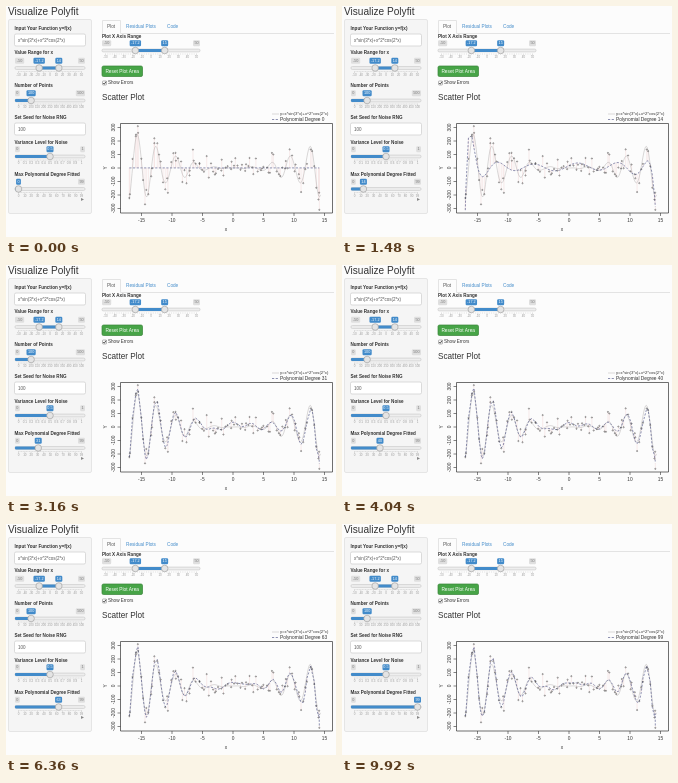
Recreate the animation shown at these times as an HTML page with a canvas. Size 330 by 231 pixels, loop 10000 ms.

```html
<!DOCTYPE html>
<html lang="en">
<head>
<meta charset="utf-8">
<title>Visualize Polyfit</title>
<style>
html, body { margin: 0; width: 100%; height: 100%; overflow: hidden; background: #fcfcfc; }
canvas { display: block; width: 330px; height: 231px; }
</style>
</head>
<body>
<canvas id="stage" width="330" height="231"></canvas>
<script>
const ctx = document.getElementById('stage').getContext('2d');
const FONT = '"Liberation Sans", Arial, sans-serif';
const BLUE = '#428bca', INK = '#333', PAPER = '#fcfcfc';
const CURVE = '#b4b0b0', FIT = '#454a80', ERROR = '#f3d9d9';
const LOOP = 10000;

function text(str, x, y, size, { color = INK, bold = false, align = 'left', turn = 0 } = {}) {
  ctx.save();
  ctx.translate(x, y);
  ctx.rotate(turn);
  ctx.font = `${bold ? 'bold ' : ''}${size}px ${FONT}`;
  ctx.fillStyle = color;
  ctx.textAlign = align;
  ctx.textBaseline = 'middle';
  ctx.fillText(str, 0, 0);
  ctx.restore();
}

function box(x, y, w, h, fill, stroke, r = 1) {
  ctx.beginPath();
  ctx.roundRect(x, y, w, h, r);
  if (fill) { ctx.fillStyle = fill; ctx.fill(); }
  if (stroke) { ctx.strokeStyle = stroke; ctx.lineWidth = 0.7; ctx.stroke(); }
}

function line(points, color, width = 0.6, dash = []) {
  ctx.beginPath();
  points.forEach(([x, y]) => ctx.lineTo(x, y));
  ctx.strokeStyle = color;
  ctx.lineWidth = width;
  ctx.setLineDash(dash);
  ctx.stroke();
  ctx.setLineDash([]);
}

// Slider with value bubbles; y is the centre of the track.
function slider({ x, w, y, min, max, values, step }) {
  const pos = v => x + 3.5 + (w - 7) * (v - min) / (max - min);
  const handles = values.map(pos);
  const tagWidth = v => 2.6 + 2.2 * String(v).replace('.', '').length;
  const lastIndex = values.length - 1;
  const first = handles[0] - tagWidth(values[0]) / 2;
  const last = handles[lastIndex] + tagWidth(values[lastIndex]) / 2;
  const tag = (value, cx, fill, color) => {
    const width = tagWidth(value);
    box(cx - width / 2, y - 10.3, width, 6, fill, null, 1.2);
    text(value, cx, y - 7.1, 3.8, { color, align: 'center' });
  };
  if (first > x + tagWidth(min)) tag(min, x + tagWidth(min) / 2, '#dfdfdf', '#777');
  if (last < x + w - tagWidth(max)) tag(max, x + w - tagWidth(max) / 2, '#dfdfdf', '#777');

  box(x, y - 1.4, w, 2.8, '#eee', '#ccc', 1.2);
  const from = lastIndex ? handles[0] : x;
  box(from, y - 1.4, handles[lastIndex] - from, 2.8, BLUE, null, 0.8);

  for (let i = 0; i <= 40; i++) {
    const tx = x + 3.5 + (w - 7) * i / 40;
    line([[tx, y + 3], [tx, y + (i % 4 ? 4 : 5)]], '#aaa', 0.35);
  }
  for (let i = 0; i <= 10; i++) {
    const v = Math.min(min + i * step, max);
    text(String(+v.toFixed(1)), pos(v), y + 7, 3, { color: '#999', align: 'center' });
  }
  handles.forEach((cx, i) => {
    ctx.beginPath();
    ctx.arc(cx, y, 3.3, 0, 7);
    ctx.fillStyle = '#e4e4e4';
    ctx.fill();
    ctx.strokeStyle = '#999';
    ctx.lineWidth = 0.6;
    ctx.stroke();
    tag(values[i], cx, BLUE, '#fff');
  });
}

const label = (str, x, y) => text(str, x, y, 4.6, { bold: true });

function field(str, y) {
  box(8.5, y - 6, 71, 12, '#fff', '#ccc', 1.5);
  text(str, 12, y + 0.3, 4.5, { color: '#555' });
}

function sidebar(degree) {
  box(2.5, 13.5, 83, 194, '#f5f5f5', '#ddd', 1.5);
  const track = { x: 9, w: 70 };
  label('Input Your Function y=f(x)', 8.5, 23);
  field('x*sin(3*x)+x^2*cos(2*x)', 34);
  label('Value Range for x', 8.5, 46.5);
  slider({ ...track, y: 62, min: -50, max: 50, values: [-17.2, 14], step: 10 });
  label('Number of Points', 8.5, 79.5);
  slider({ ...track, y: 94.5, min: 0, max: 500, values: [100], step: 50 });
  label('Set Seed for Noise RNG', 8.5, 111.5);
  field('100', 123);
  label('Variance Level for Noise', 8.5, 136.5);
  slider({ ...track, y: 150.5, min: 0, max: 1, values: [0.5], step: 0.1 });
  label('Max Polynomial Degree Fitted', 8.5, 168.5);
  slider({ ...track, y: 183, min: 0, max: 99, values: [degree], step: 10 });
  text('▸', 76.5, 193.5, 6, { color: '#888', align: 'center' });
}

function controls() {
  line([[96, 27.5], [96.5, 27.5], [96.5, 14.5], [114.5, 14.5], [114.5, 27.5], [328, 27.5]], '#ddd', 0.8);
  text('Plot', 101, 20.7, 4.7, { color: '#555' });
  text('Residual Plots', 120, 20.7, 4.7, { color: BLUE });
  text('Code', 161, 20.7, 4.7, { color: BLUE });
  label('Plot X Axis Range', 96, 30.7);
  slider({ x: 96, w: 98, y: 44.5, min: -50, max: 50, values: [-17.2, 15], step: 10 });
  box(96, 60, 40.5, 10.5, '#47a447', '#398439', 1.5);
  text('Reset Plot Area', 116.2, 65.4, 4.8, { color: '#fff', align: 'center' });
  box(96.5, 75, 4, 4, '#fff', '#999', 0.6);
  line([[97.2, 77], [98.3, 78.2], [100, 75.6]], '#222', 0.8);
  text('Show Errors', 102, 77.2, 4.6);
  text('Scatter Plot', 96, 91.7, 8.2);
}

const px = x => 227 + 6.1 * x;
const py = y => 162 - 0.135 * y;
const model = x => x * Math.sin(3 * x) + x * x * Math.cos(2 * x);

function seeded(seed) {
  return () => (seed = seed * 16807 % 2147483647) / 2147483647;
}

// Noisy samples of the model, with the outermost peaks and ends pinned.
function sample(count, from, to) {
  const random = seeded(100);
  const pinned = [[-17, -222], [-15.6, 310], [-12.9, 220], [14.15, -310]];
  const noise = () => 75 * (random() + random() + random() - 1.5);
  const points = Array.from({ length: count }, (_, i) => {
    const x = from + (to - from) * (i + random()) / count;
    return [x, model(x) + noise()];
  });
  return [...pinned, ...points].sort((a, b) => a[0] - b[0]).map(([x, y]) => [px(x), py(y)]);
}

const dots = sample(96, -16.9, 14.4);
const curve = Array.from({ length: 210 }, (_, i) => {
  const x = -17 + 0.15 * i;
  return [px(x), py(model(x))];
});

const dot = (a, b) => a.reduce((sum, v, i) => sum + v * b[i], 0);

// Least-squares fits for rising degree, using polynomials orthogonal on the points.
function polynomialFits(maxDegree) {
  const xs = dots.map(([x]) => (x - 219) / 96);
  const ys = dots.map(([, y]) => y);
  const basis = [], fits = [];
  let next = xs.map(() => 1), fit = xs.map(() => 0);
  for (let k = 0; k <= maxDegree; k++) {
    for (let pass = 0; pass < 2; pass++) {
      for (const q of basis) {
        const c = dot(q, next);
        next = next.map((v, i) => v - c * q[i]);
      }
    }
    const norm = Math.sqrt(dot(next, next));
    const q = next.map(v => v / norm);
    basis.push(q);
    const c = dot(q, ys);
    fit = fit.map((v, i) => v + c * q[i]);
    fits.push(fit);
    next = q.map((v, i) => v * xs[i]);
  }
  return fits;
}

// High powers become nearly collinear, so the fit settles.
const usableDegree = d => d < 32 ? d : 32 + Math.floor((d - 32) / 9);
const fits = polynomialFits(usableDegree(99));

function plot(degree) {
  const fit = fits[usableDegree(degree)];
  dots.forEach(([x, y], i) => line([[x, y], [x, fit[i]]], ERROR, 0.5));
  line(curve, CURVE, 0.5);
  line(dots.map(([x], i) => [x, fit[i]]), FIT, 0.6, [2.2, 1.5]);
  for (const [x, y] of dots) {
    ctx.beginPath();
    ctx.arc(x, y, 0.6, 0, 7);
    ctx.strokeStyle = '#444';
    ctx.lineWidth = 0.5;
    ctx.stroke();
  }
  box(114.5, 117.5, 212, 89.5, null, '#333', 0);
  for (let v = -15; v <= 15; v += 5) {
    line([[px(v), 207], [px(v), 210]], INK, 0.6);
    text(v, px(v), 214.5, 4.8, { align: 'center' });
  }
  for (let v = -300; v <= 300; v += 100) {
    line([[111.5, py(v)], [114.5, py(v)]], INK, 0.6);
    text(v, 107.5, py(v), 4.8, { align: 'center', turn: -Math.PI / 2 });
  }
  text('x', 220, 224, 4.8, { align: 'center' });
  text('Y', 99.5, 162, 4.8, { align: 'center', turn: -Math.PI / 2 });
  line([[266, 108], [273, 108]], CURVE, 0.5);
  line([[266, 113.5], [273, 113.5]], FIT, 0.6, [2.2, 1.5]);
  text('y=x*sin(3*x)+x^2*cos(2*x)', 274, 108, 4.2);
  text('Polynomial Degree ' + degree, 274, 113.5, 4.8);
}

// Steps of 109 ms land on 40 ms ticks; nine of them cover ten degrees each second.
function degreeAt(ms) {
  const t = ms + 160;
  const second = Math.floor(t / 1000);
  const ticks = Math.floor((t - second * 1000) / 40) + 1;
  const step = Math.min(8, Math.ceil(ticks * 40 / 109) - 1);
  return Math.max(0, second * 10 + step - 2);
}

let shown = -1;
function frame(now) {
  const degree = degreeAt(now % LOOP);
  if (degree !== shown) {
    shown = degree;
    ctx.fillStyle = PAPER;
    ctx.fillRect(0, 0, 330, 231);
    text('Visualize Polyfit', 2, 5.8, 10.1);
    sidebar(degree);
    controls();
    plot(degree);
  }
  requestAnimationFrame(frame);
}
frame(performance.now());
</script>
</body>
</html>
```
